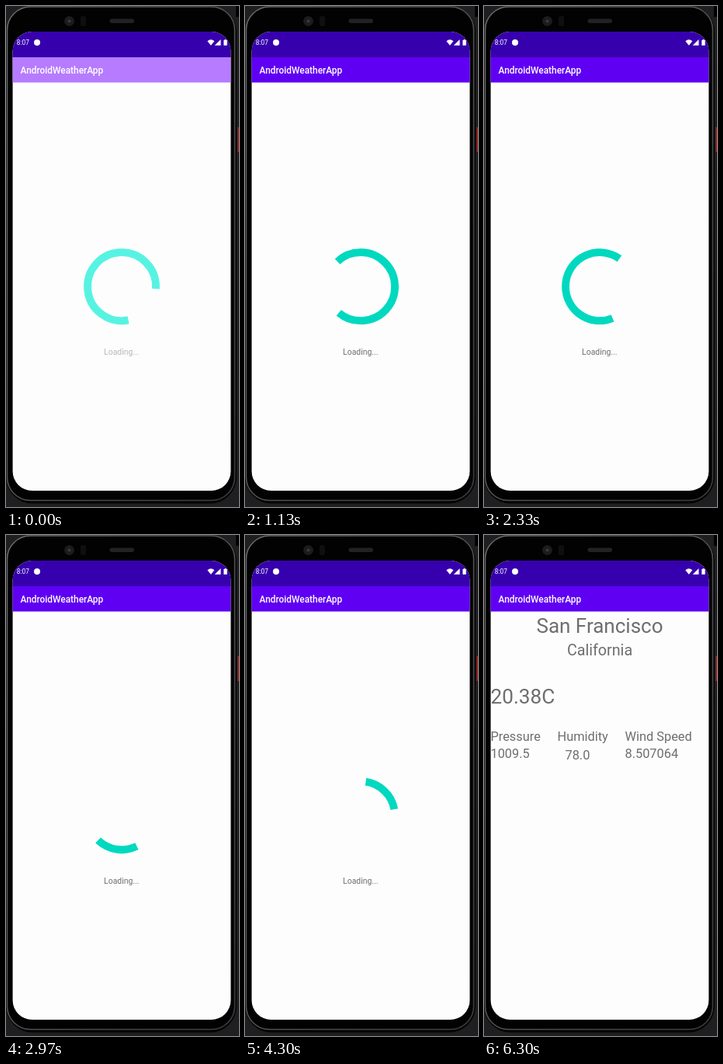
Write an HTML page that moves like this. It is 300x645 px and loops after 6.36 s.

```html
<!DOCTYPE html>
<html lang="en">
<head>
<meta charset="utf-8">
<title>Weather app loading</title>
<style>
  html, body { margin: 0; width: 100%; height: 100%; overflow: hidden; background: #1b1b1f; }
  svg { display: block; width: 300px; height: 645px; font-family: Roboto, Arial, sans-serif; }
  #weather { fill: #6e6e6e; font-size: 16.35px; }
</style>
</head>
<body>
<svg viewBox="0 0 300 645">
  <defs>
    <clipPath id="screen"><rect x="8.600" y="33" width="280.800" height="591" rx="25"/></clipPath>
    <linearGradient id="rim" x2="1" y2="1">
      <stop stop-color="#6a6a6c"/>
      <stop offset="1" stop-color="#3c3c3e"/>
    </linearGradient>
  </defs>

  <!-- desktop and phone body -->
  <rect width="300" height="645" fill="#1f1f22"/>
  <rect x="296" width="4" height="14" fill="#000"/>
  <rect x="298.500" y="156" width="1.500" height="32" fill="#b5281f"/>
  <rect x="0" y="0" width="297" height="640.500" rx="34" fill="#050505"/>
  <rect x="1.500" y="1" width="293" height="635.500" rx="30" fill="#020202" stroke="url(#rim)" stroke-width="1.600"/>
  <circle cx="81.500" cy="19.500" r="6.500" fill="#1c1c1e"/>
  <circle cx="81.500" cy="19.500" r="2" fill="#3a3a3e"/>
  <rect x="96" y="13" width="7" height="13" rx="2" fill="#0f0f10"/>
  <rect x="133.500" y="16.500" width="31.500" height="5.500" rx="2.700" fill="#222224"/>

  <g clip-path="url(#screen)">
    <rect x="8" y="33" width="282" height="592" fill="#fdfdfd"/>
    <rect x="8" y="33" width="282" height="33" fill="#3700ae"/>
    <rect id="header" x="8" y="66" width="282" height="32.500"/>
    <text x="18.500" y="86.800" font-size="11.900" font-weight="500" fill="#fff">AndroidWeatherApp</text>

    <g id="weather">
      <text x="149" y="126" font-size="26" text-anchor="middle">San Francisco</text>
      <text x="149" y="154.500" font-size="19.700" text-anchor="middle">California</text>
      <text x="8.500" y="217" font-size="26.200">20.38C</text>
      <text x="8.500" y="265">Pressure</text>
      <text x="94.500" y="265">Humidity</text>
      <text x="181.500" y="265">Wind Speed</text>
      <text x="8.500" y="287">1009.5</text>
      <text x="104.500" y="289">78.0</text>
      <text x="181.500" y="287">8.507064</text>
    </g>
    <text id="label" x="148.800" y="449" font-size="10.400" text-anchor="middle">Loading...</text>
    <path id="arc" fill="none" stroke-width="9.800"/>

    <!-- status bar -->
    <g fill="#fff">
      <text x="13.800" y="50" font-size="8.300">8:07</text>
      <circle cx="40" cy="47" r="4"/>
      <path d="M259.300 45.200Q263.800 41.500 268.300 45.200L263.800 50.800Z"/>
      <path d="M276.500 43V50.800H268.700Z"/>
      <path d="M280.300 44H281.500V43H283.500V44H284.700V50.800H280.300Z"/>
    </g>
  </g>
</svg>
<script>
const LOOP = 6360, LOADED = 4800, FADE = 130;
const [header, weather, label, arc] =
  ["header", "weather", "label", "arc"].map(id => document.getElementById(id));

// spinner turns completed at given times; the pace is uneven during start-up
const pace = [[0, 0.541], [530, 0.813], [1670, 1.778], [2970, 2.743], [LOADED, 4.117]];

function turnsAt(t) {
  const i = Math.max(1, pace.findIndex(p => p[0] >= t));
  const [t0, a] = pace[i - 1], [t1, b] = pace[i];
  return a + (b - a) * (t - t0) / (t1 - t0);
}

// cubic-bezier(.4, 0, .2, 1)
function ease(x) {
  if (x <= 0) return 0;
  if (x >= 1) return 1;
  let lo = 0, hi = 1, s;
  for (let i = 0; i < 24; i++) {
    s = (lo + hi) / 2;
    const r = 1 - s;
    if (1.2 * r * r * s + 0.6 * r * s * s + s * s * s < x) lo = s; else hi = s;
  }
  return s * s * (3 - 2 * s);
}

function point(deg) {
  const a = deg * Math.PI / 180, r = 44;
  return `${149 + r * Math.sin(a)} ${361.2 - r * Math.cos(a)}`;
}

function arcPath(turns) {
  const lap = Math.floor(turns), p = turns - lap;
  const base = 9 + 216 * lap + 286 * p;
  const head = 290 * ease(2 * p), tail = 290 * ease(2 * p - 1);
  const big = head - tail > 180 ? 1 : 0;
  return `M${point(base + tail)}A44 44 0 ${big} 1 ${point(base + head)}`;
}

const mix = (from, to, k) => `rgb(${from.map((c, i) => c + (to[i] - c) * k)})`;

function draw(t) {
  const loading = t < LOADED;
  const shown = Math.min(1, t / FADE);
  header.setAttribute("fill", mix([183, 124, 255], [96, 0, 243], shown));
  label.setAttribute("fill", mix([184, 184, 184], [110, 110, 110], shown));
  arc.setAttribute("stroke", mix([88, 243, 226], [0, 217, 191], shown));
  weather.style.display = loading ? "none" : "";
  label.style.display = arc.style.display = loading ? "" : "none";
  if (loading) arc.setAttribute("d", arcPath(turnsAt(t)));
}

const start = performance.now();
function tick() {
  draw((performance.now() - start) % LOOP);
  requestAnimationFrame(tick);
}
tick();
</script>
</body>
</html>
```
